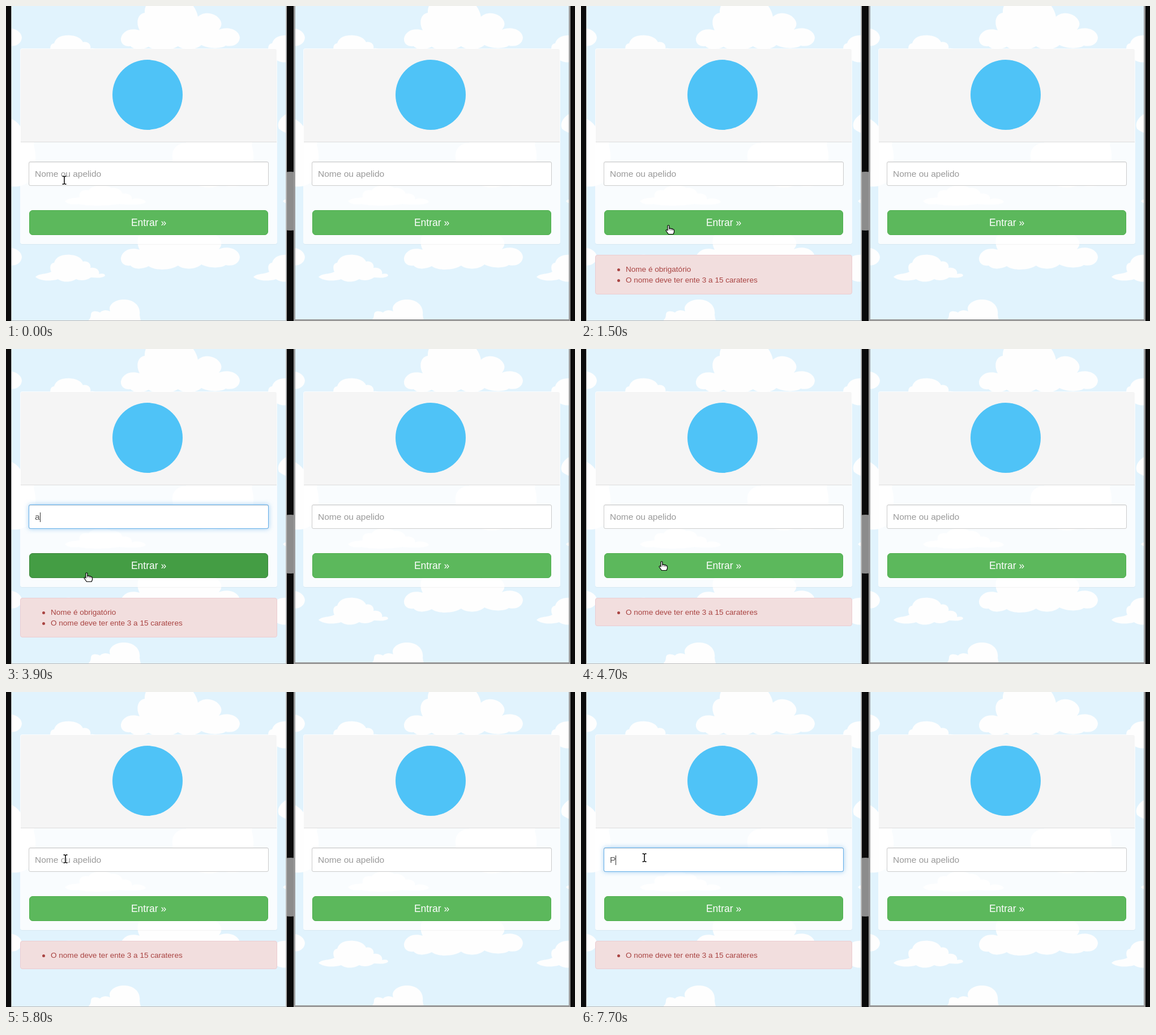
An HTML page for the animation above (8 s loop, 1005 px wide and 557 px high).

```html
<!DOCTYPE html>
<html lang="pt">
<head>
<meta charset="utf-8">
<title>Entrar</title>
<style>
html, body { margin: 0; width: 100%; height: 100%; overflow: hidden; background: #0b0b0b; }
body { position: relative; font-family: "Liberation Sans", Arial, sans-serif; }
div, svg { position: absolute; box-sizing: border-box; }
.ball { left: 451px; top: 293px; width: 104px; height: 104px; border-radius: 50%; background: #8c8c8c; }
.pane { top: 0; width: 505px; height: 557px; }
.sky { left: 0; top: 0; clip-path: inset(0 9px 0 9px); }
.frame { left: 9px; top: 0; width: 487px; height: 557px; border: solid #b8b8b8; border-width: 0 2px 1px 1px; }
.second .sky { clip-path: inset(0 8px 0 8px); }
.second .frame { left: 8px; width: 489px; border-color: #999; border-width: 0 3px 3px; }
.panel { left: 25px; top: 75px; width: 454px; height: 346px; border: 1px solid transparent; border-radius: 4px;
  background: rgba(255,255,255,.8); box-shadow: 0 1px 1px rgba(0,0,0,.05); }
.head { left: 0; top: 0; width: 452px; height: 165px; background: #f5f5f5;
  border-bottom: 1px solid #ddd; border-radius: 3px 3px 0 0; }
.logo { left: 162px; top: 19px; width: 124px; height: 124px; border-radius: 50%; background: #4fc3f7; }
.field, .glow { left: 40px; top: 275px; width: 424px; height: 43px; border-radius: 3px; }
.field { border: 1px solid #ccc; background: #fff; box-shadow: inset 0 1px 1px rgba(0,0,0,.075);
  padding-left: 10px; font-size: 15.5px; line-height: 41px; color: #555; white-space: pre; }
.glow { border: 1px solid #66afe9; opacity: 0;
  box-shadow: inset 0 1px 1px rgba(0,0,0,.075), 0 0 8px rgba(102,175,233,.6); }
.hint { color: #999; }
.caret { display: inline-block; width: 1px; height: 17px; margin-right: -1px; vertical-align: -4px; background: #333; }
.btn { left: 41px; top: 361px; width: 422px; height: 44px; border: 1px solid #4cae4c; border-radius: 6px;
  background: #5cb85c; color: #fff; font-size: 17.5px; line-height: 42px; text-align: center; }
.btn.hover { background: #449d44; border-color: #398439; }
.btn.down { background: #398439; border-color: #255625; }
.alert { left: 25px; top: 440px; width: 454px; border: 1px solid #ebccd1; border-radius: 4px;
  background: #f2dede; color: #a94442; font-size: 13.56px; line-height: 19.4px; padding: 14.5px 0 14.5px 53px; }
.alert p { margin: 0; position: relative; white-space: nowrap; }
.alert p::before { content: ""; position: absolute; left: -15px; top: 8px; width: 5px; height: 5px;
  border-radius: 50%; background: #a94442; }
.cursor { left: 0; top: 0; overflow: visible; }
</style>
</head>
<body>
<script>
const LOOP = 8000, TILE_W = 385, TILE_H = 388;
const START = performance.now();

const clouds = [
  "M203 57C206 44 220 38 236 43C229 30 232 14 245 12C244-8 262-22 290-20C318-18 335-2 339 19C350 8 372 12 379 26C382 32 380 37 376 42C392 35 412 42 413 56C412 68 400 73 388 70C380 76 358 76 345 69C335 79 312 78 304 71C290 80 262 80 252 72C240 78 226 78 220 71C210 72 202 67 203 57Z",
  "M52 91C60 84 70 87 80 82C76 74 79 66 85 66C88 55 100 51 114 52C127 53 133 58 136 64C144 62 151 68 149 75C160 73 166 80 164 86C172 84 177 87 174 90C166 94 158 92 150 92C142 98 130 98 124 95C112 102 98 100 92 95C84 98 62 100 52 91Z",
  "M150 158C150 151 158 150 166 154C172 148 180 150 184 152C179 140 194 130 210 131C228 132 238 144 236 158C238 175 250 202 230 224C200 234 120 238 97 217C90 202 110 187 130 182C140 172 150 168 150 158Z",
  "M104 345C112 338 124 340 130 338C128 328 136 324 146 326C152 316 176 314 186 322C196 320 204 326 206 332C216 330 224 336 222 342C232 338 246 342 247 347C240 352 220 352 200 350C180 354 140 354 128 350C118 352 108 350 104 345Z",
  "M294 268C292 252 304 242 318 242C316 215 340 195 370 195C395 195 405 205 412 215C428 216 438 230 434 246C440 264 438 290 424 312C412 321 394 321 382 316C366 323 344 322 332 314C312 312 294 290 294 268Z"
];

function sky() {
  let tiles = "";
  for (const dx of [-TILE_W, 0, TILE_W])
    for (const dy of [0, TILE_H])
      tiles += `<path transform="translate(${dx} ${dy})" d="${clouds.join("")}"/>`;
  return `<svg class="sky" width="505" height="557"><rect width="505" height="557" fill="#e1f3fd"/><g fill="#fefefe">${tiles}</g></svg>`;
}

const hint = '<span class="hint">Nome ou apelido</span>';

const pane = (x, cls) => `<div class="pane ${cls}" style="left:${x}px">${sky()}
  <div class="frame"></div>
  <div class="panel"><div class="head"><div class="logo"></div></div></div>
  <div class="field">${hint}</div><div class="glow"></div>
  <div class="btn">Entrar »</div></div>`;

const beam = "M-3.5-7H-1.5L0-6L1.5-7H3.5M0-6V6M-3.5 7H-1.5L0 6L1.5 7H3.5";
const hand = "M-4-7.5Q-2.5-9-1.2-7.5V-2.5Q.8-3.6 2-2Q3.8-2.8 5-1.2Q7.3-1.6 7.5.8V4L6 7.5H-2.5L-6.8 1.5Q-7-.8-4.8 0L-4 1Z";

document.body.innerHTML = '<div class="ball"></div>' + pane(0, "first") + pane(500, "second") +
  `<div class="alert"></div>
  <svg class="cursor" width="1" height="1">
    <g id="beam" fill="none"><path d="${beam}" stroke="#fff" stroke-width="3.4"/><path d="${beam}" stroke="#000" stroke-width="1.5"/></g>
    <g id="hand"><path d="${hand}" fill="#fff" stroke="#000" stroke-width="1.2" stroke-linejoin="round"/><path d="M-1.2-2V.5M2-1.5V1M5-.8V1.3" stroke="#000" stroke-width=".8"/></g>
  </svg>`;

const $ = s => document.querySelector(s);
const field = $(".first .field"), glow = $(".first .glow"), btn = $(".first .btn");
const alertBox = $(".alert");
const cursors = { beam: $("#beam"), hand: $("#hand") };

const needName = "Nome é obrigatório", badLength = "O nome deve ter ente 3 a 15 carateres";
const at = (cur, x, y, btn = "") => ({ cur, x, y, btn });

// Each step changes only the listed parts and holds until the next one.
const steps = [
  [0, { ...at("beam", 103, 308), text: "", focus: 0, caret: false, errors: [] }],
  [200, at("beam", 113, 325)],
  [300, at("hand", 141, 374, "hover")],
  [400, at("hand", 157, 396, "hover")],
  [1400, { btn: "down" }],
  [1500, { btn: "", errors: [needName, badLength] }],
  [2300, at("hand", 152, 378, "hover")],
  [2400, at("beam", 132, 271)],
  [3500, { cur: "", text: "a", focus: 1, caret: true }],
  [3800, at("hand", 142, 378, "hover")],
  [3900, at("hand", 145, 404, "hover")],
  [4000, at("hand", 145, 394, "hover")],
  [4100, at("hand", 145, 384, "hover")],
  [4500, { btn: "down", focus: .5, caret: false }],
  [4600, { btn: "hover", focus: 0 }],
  [4700, { btn: "", text: "", errors: [badLength] }],
  [5400, at("hand", 143, 380, "hover")],
  [5500, at("hand", 136, 367, "hover")],
  [5600, at("beam", 123, 337)],
  [5700, at("beam", 110, 307)],
  [5800, at("beam", 105, 295)],
  [6200, { focus: .5, caret: true }],
  [6300, { focus: 1 }],
  [6400, { x: 107 }],
  [6500, { x: 110, y: 294 }],
  [6600, { x: 112, y: 293 }],
  [6800, { caret: false }],
  [7400, { caret: true }],
  [7700, { text: "P" }]
];

let shown = -1;

function draw(now) {
  const t = Math.max(0, now - START) % LOOP;
  const index = steps.filter(s => s[0] <= t).length;
  if (index !== shown) {
    shown = index;
    const s = Object.assign({}, ...steps.slice(0, index).map(e => e[1]));
    const caret = s.caret ? '<span class="caret"></span>' : "";
    field.innerHTML = s.text ? s.text + caret : caret + hint;
    glow.style.opacity = s.focus;
    btn.className = "btn " + s.btn;
    alertBox.style.display = s.errors.length ? "" : "none";
    alertBox.innerHTML = s.errors.map(e => `<p>${e}</p>`).join("");
    for (const [name, el] of Object.entries(cursors)) {
      el.style.display = name === s.cur ? "" : "none";
      el.setAttribute("transform", `translate(${s.x} ${s.y})`);
    }
  }
  requestAnimationFrame(draw);
}
draw(START);
</script>
</body>
</html>
```
